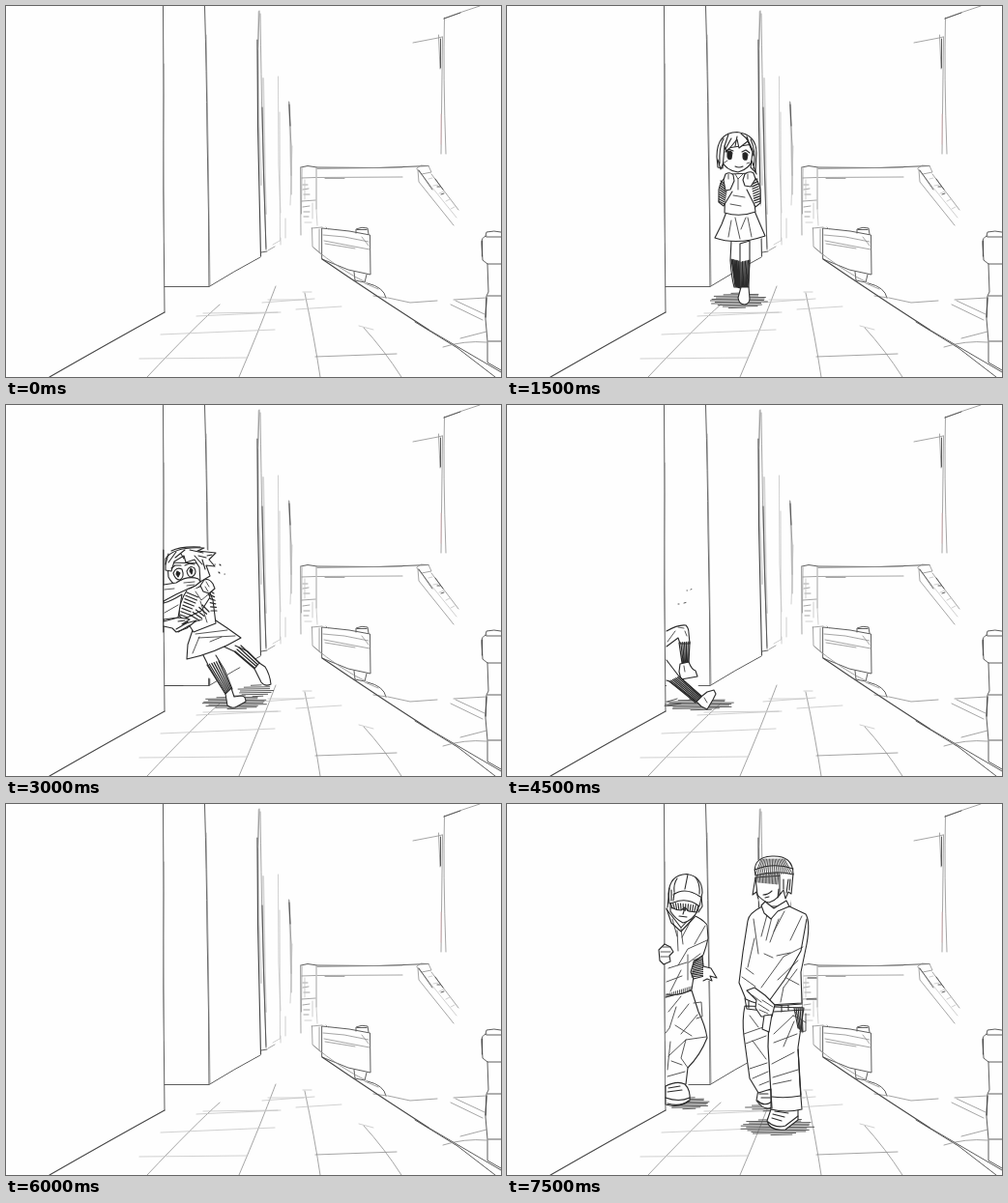
An HTML page for the animation above (8 s loop, 512 by 384 pixels).

```html
<!DOCTYPE html>
<html lang="en">
<head>
<meta charset="utf-8">
<title>Street sketch</title>
<style>
html, body { margin: 0; width: 100%; height: 100%; overflow: hidden; background: #fefefe; }
svg { display: block; width: 100vw; height: 100vh; }
path { fill: none; stroke: #555; stroke-width: .95; stroke-linecap: round; stroke-linejoin: round; }
.pale { stroke: #c4c4c4; stroke-width: .8; }
.mid { stroke: #8f8f8f; stroke-width: .8; }
.soft { stroke: #bbb; stroke-width: 2; stroke-opacity: .6; }
.bold { stroke: #484848; stroke-width: 1.15; }
.pose path { stroke: #2a2a2a; stroke-width: 1.1; }
.pose .body { fill: #fefefe; }
.pose .mask { fill: #fefefe; stroke: none; }
.pose .ink { fill: #222; }
.pose .fine { stroke: #444; stroke-width: .9; }
.pose .shade { stroke: #555; stroke-width: .95; }
.pose .dense { stroke-width: 1.2; }
.pose { opacity: 0; animation: 8s step-end infinite; }
.walk { animation-name: walk; }
.grab { animation-name: grab; }
.legs { animation-name: legs; }
.pair { animation-name: pair; }
@keyframes walk { 0%, 37.5%, 100% { opacity: 0 } 18.75% { opacity: 1 } }
@keyframes grab { 0%, 56.25%, 100% { opacity: 0 } 37.5% { opacity: 1 } }
@keyframes legs { 0%, 75%, 100% { opacity: 0 } 56.25% { opacity: 1 } }
@keyframes pair { 0% { opacity: 0 } 93.75%, 100% { opacity: 1 } }
</style>
</head>
<body>
<svg viewBox="0 0 512 384" preserveAspectRatio="none">
  <!-- buildings -->
  <path d="M162.5 0L163 92 162.8 190 164 317"/>
  <path class="mid" d="M163.2 60L162.6 135 163.6 245"/>
  <path class="bold" d="M164 317Q106 349 45 384"/>
  <path d="M164 290.5L210 290.5Q235 275 263 260"/>
  <path d="M205.5 0Q207.5 70 208 130L209.5 215 210 290"/>
  <path class="mid" d="M207 30L209 145 211 289"/>
  <path class="soft" d="M261.5 6L260.5 45 261.5 120 264 185M266 75L268 185 269 215M293 100L295 175"/>
  <path class="bold" d="M260 35L260.5 125 263.5 259"/>
  <path class="mid" d="M262 5L260.5 45M263 8Q264 75 265 125L269 250"/>
  <path d="M265 105L266.5 175 269 252M264 255L270 254"/>
  <path class="mid" d="M271 253L278 249M292.5 99L295 145 295 195"/>
  <path d="M293 102L294 124"/>
  <path class="pale" d="M281.5 73L282 165 284 214M283 110L283.5 243M296 145L294 206M284 240V247M289 220V240M276 247L283 243"/>
  <!-- footbridge -->
  <path d="M305 167L312 165.5 322 167 385 167.5 437 165.5"/>
  <path class="mid" d="M322 168.5L410 167M322 177.5L410 177M330 178.5H350"/>
  <path class="mid" d="M304.5 167L305 237M306 168L305.5 215M321 167V210M306 178L320 177.5M306 202L320 201M307 185H312M307 190L313 189M308 195H314M307 208L314 207M308 213H314M308 218H313"/>
  <path class="pale" d="M309 180V200M317 204V220M309 224H316M321 210L322 227"/>
  <path class="mid" d="M425 168L429 165 437 165.5 440 172 430 174ZM426 170L427 182 463 227M440 174L468 211"/>
  <path class="pale" d="M429 173L449 198 466 219M437 179L441 178M442 186L447 185M448 194L453 192M455 202L459 200M460 210L464 208"/>
  <path d="M427 170L441 190M444 179L452 190M446 187L449 187M450 195L453 194"/>
  <!-- lamp and far building -->
  <path class="mid" d="M421 38L447 33 451 32M447.5 30L449 65M451.5 32L450 153M453.5 12Q452 70 455 153M453 13L472 6 490 0"/>
  <path d="M453 13L470 7M449.5 34V64"/>
  <path d="M450 112V143" style="stroke:#e3b7ba;stroke-width:.8"/>
  <!-- guard rail -->
  <path d="M327 230L355 233 376.5 237 377 278 354 273 327 262ZM362 235L362 231Q368 228 374 230L375 236M363 231.5H373"/>
  <path class="mid" d="M316 230L327 229M316.5 230L317 249 327 258M324 231V255M328 237L350 239 375 244M329 243L376 252M330 246L361 251M331 229L333 231M368 239L375 248"/>
  <path d="M360 275L361 284 371 286 373 278M374 287Q391 291 393 302"/>
  <path class="mid" d="M318 250Q345 273 374 287M371 287L385 293M380 300L394 302"/>
  <path class="bold" d="M327 262L352 279 394 307 437 335"/>
  <path d="M437 335L512 379M423 327L467 354 506 384"/>
  <!-- near post -->
  <path d="M496 238L497 234Q505 232 512 234M497 239H512M497 238Q491 239 492 247L493 263 498 267H512M498 267L499 296 497 300 496 324 498 347V369L512 377M498 300H512M499 347H512"/>
  <path class="bold" d="M492.5 243V259M497 302L496 322"/>
  <path class="mid" d="M452 353Q474 346 497 348M463 304L497 302M395 302L418 307 446 305M465 305L495 319M460 309L493 325M470 344L497 337"/>
  <!-- paving -->
  <path class="mid" d="M221 309Q195 332 146 384M279 290Q262 335 241 384M309 297Q319 344 325 384M370 333Q391 356 409 384M320 363L404 360"/>
  <path class="pale" d="M197 321L284 317M204 318L281 317M160 340L278 335M138 365L250 364M265 307L319 303M271 304H308M300 314L347 311M307 296H316M365 331L380 335"/>

  <g class="pose walk">
    <path class="mask" d="M218 168L217 150 226 133 240 130 254 138 258 174 263 208 267 239 251 245 250 308 240 309 235 292 232 243 216 240 226 212 219 205Z"/>
    <path class="shade" data-shade="241 305 29 8 11"/>
    <path class="body" d="M232 243L231 263Q232 280 235 291L241 291 241 246 251 243 251 262 250 291 241 291"/>
    <path class="dense" data-hatch="232 262 240 264 236 290 241 292 7"/>
    <path class="dense" data-hatch="242 265 251 263 242 293 249 292 7"/>
    <path class="body" d="M242 291L239 302Q240 309 246 309 251 308 251 303L250 291Z"/>
    <path class="body" d="M227 213L222 226 215 240Q238 248 267 238L261 224 256 212Z"/>
    <path class="fine" d="M232 222L229 239M236 219L241 241M249 219L253 239M247 219L242 231"/>
    <path class="body" d="M231 174Q225 188 225 214 241 219 257 213L254 190 252 173Z"/>
    <path class="body" d="M228 176Q221 180 219 190L219 203 224 207 233 192M252 175Q260 178 262 190L262 204 257 208 248 190"/>
    <path class="dense" data-hatch="221 181 219 202 228 187 225 205 10"/>
    <path class="dense" data-hatch="253 182 256 204 259 179 262 202 10"/>
    <path class="body" d="M224 180L226 174Q231 171 234 175L235 181 231 190 226 191ZM244 180L246 174Q251 170 255 173L257 179 252 187 246 186Z"/>
    <path class="fine" d="M229 174V179M249 174V179M236 174L239 179 244 174M239 179V190M234 196L246 198M231 205L242 207"/>
    <path class="body" d="M222 148L222 160Q226 170 239 172 251 169 255 157L254 143Z"/>
    <path class="body" d="M218 167L217 156Q217 131 238 130.5 258 133 258 152L257 172 252 167 254 151 249 140 240 147 238 138 227 151 225 145 223 168Z"/>
    <path d="M224 137Q219 147 220 163M229 133L225 145M242 132Q253 140 255 155M252 138Q258 150 255 168M238 135L236 145M232 137L226 148M248 135L253 149M218 159L221 169 224 162M253 160L258 174"/>
    <path class="ink" d="M228 151Q231 149 233 152L232 158Q229 160 228 156ZM244 153Q247 150 249 154L248 159Q244 160 244 156Z"/>
    <path d="M226 151L229 148 234 150M243 151L247 149 251 152M236 166Q240 168 244 166"/>
    <path class="fine" d="M225 162L228 160M248 163L251 162"/>
  </g>

  <g class="pose grab">
    <path class="mask" d="M164 160L171 149 197 146 216 153 211 180 218 213 243 241 236 248 264 268 274 289 264 290 238 268 210 284 209 282 202 258 187 263 192 236 176 236 164 222Z"/>
    <path class="shade" data-shade="259 296 18 6 7"/>
    <path class="shade" data-shade="238 308 33 7 10"/>
    <path class="body" d="M203 257L209 269 227 299 234 294 226 274 217 259M223 249L236 255 257 273 262 267 250 255 237 249"/>
    <path class="dense" data-hatch="208 269 220 265 227 299 233 294 6"/>
    <path class="dense" data-hatch="237 255 243 249 257 272 262 267 4"/>
    <path class="body" d="M227 299L229 311Q234 315 239 312L248 307Q248 301 243 301L236 302 233 293ZM257 273L264 287Q268 292 274 289 273 279 268 271L262 267Z"/>
    <path class="body" d="M193 233L188 248 187 263Q216 257 243 241L229 231 217 223Z"/>
    <path class="fine" d="M196 237L229 233M199 241L237 239M211 245L223 240M200 240L193 257"/>
    <path class="body" d="M190 194L180 213 194 235 217 226 214 202 207 184Z"/>
    <path class="body" d="M187 192Q179 204 179 218L183 222 202 213 211 199 206 188"/>
    <path class="fine" d="M196 193L202 202 213 193M201 203L208 225M190 226L203 222"/>
    <path class="dense" data-hatch="187 194 180 217 199 199 188 220 8"/>
    <path class="dense" data-hatch="190 217 203 207 200 223 210 214 5"/>
    <path class="dense" data-hatch="210 192 212 213 215 195 218 213 6"/>
    <path class="body" d="M167 163L168 178Q174 190 190 190 204 185 207 164Z"/>
    <path class="body" d="M165 171L165 159Q174 146 205 148L198 151 217 153 210 160 216 167 207 166 211 177 201 183 200 168 195 160 186 163 184 156 174 162 171 172Z"/>
    <path d="M176 152L168 163M185 150L175 158M190 150L204 153M199 156L207 158M171 151Q180 146 201 147M203 160L206 170M195 156L203 165M181 154L184 159M208 156L213 155M168 154L165 165"/>
    <path class="body" d="M173 174Q176 167 182 170 185 178 180 181 175 181 173 174ZM187 172Q190 165 195 169 198 175 192 178 188 178 187 172Z"/>
    <path class="ink" d="M177 172L180 174 178 178 176 175ZM191 169L193 171 192 175 190 172Z"/>
    <path d="M171 169L175 166 181 166M185 166L190 164 195 165"/>
    <path class="body" d="M163 186L176 184Q188 176 199 180L201 183 196 187 189 190 176 196 163 203"/>
    <path class="body" d="M201 187L205 181Q210 179 214 185L216 190 210 195 204 193Z"/>
    <path class="fine" d="M184 184L195 183M187 187L195 186M164 191L174 190M207 183L210 188M206 188L209 193"/>
    <path class="body" d="M163 205Q171 203 182 196L178 220 163 222"/>
    <path class="body" d="M163 224L178 220Q188 221 190 222L182 227 197 223 187 231 176 235 172 231 163 229"/>
    <path d="M176 232L188 225M178 235L190 228M178 224L185 223"/>
    <path class="fine" d="M164 215L178 207M165 290.5H183"/>
    <path d="M216 165H216.3M221 165L222 166M220 173L221 174M226 175H226.3"/>
    <path d="M162.8 150V235M210 283V290"/>
  </g>

  <g class="pose legs">
    <path class="mask" d="M164.5 233L187 229 190 266 197 282 198 293 165 295Z"/>
    <path class="shade" data-shade="200 310 36 6 9"/>
    <path class="body" d="M165 234Q177 227 185 228 188 231 188 236L189 247 179 247 177 241 165 250"/>
    <path class="fine" d="M166 245L174 234M184 234L186 239M177 230L183 231"/>
    <path class="dense" data-hatch="178 246 189 245 181 267 188 267 7"/>
    <path class="body" d="M179 268L188 266Q191 274 195 275L197 281 180 284 178 276Z"/>
    <path class="body" d="M165 264L178 281 202 303 196 307 168 286 165 285"/>
    <path class="dense" data-hatch="168 286 178 281 195 308 202 302 7"/>
    <path class="body" d="M196 307L202 301 207 297 214 295 216 299 213 305 207 315 201 312Z"/>
    <path class="fine" d="M204 303L207 308M166 307L176 304M166 311L180 309M183 270L184 276"/>
    <path class="fine" d="M177 206H178M183 205L185 204.5M186 192H186.5M190 191L191 190.5"/>
  </g>

  <g class="pose pair">
    <path class="mask" d="M164 108L168 80 184 72 202 82 200 113 208 125 204 168 217 178 210 183 193 183 206 242 187 274 188 307 164 312Z"/>
    <path class="shade" data-shade="188 310 22 6 9"/>
    <path class="body" d="M164 200L191 193 198 215Q205 229 207 242 200 260 187 273L185 290 164 293"/>
    <path class="fine" d="M180 199L167 215M175 210L168 232 164 237M188 207L177 221M197 218L180 238M206 241L185 244 167 261M185 244L180 263 187 273M193 206L201 205 202 220 196 222M169 246L166 275M166 282L184 277M170 266L181 270M174 229L191 240"/>
    <path class="body" d="M164 292Q176 286 184 290 190 296 189 307 178 315 164 311Z"/>
    <path class="dense" d="M164 304Q178 309 189 304M166 310Q179 314 188 307"/>
    <path d="M167 294L179 292M166 298L181 296"/>
    <path class="body" d="M165 109L173 119 180 128 192 115Q201 118 207 125L208 139Q206 148 203 156L195 166 191 192Q179 199 165 197"/>
    <path class="fine" d="M171 119L176 137M176 131L177 152M180 129L182 145M191 119L181 138M205 126L194 145M207 141L187 150 177 167M187 156V182M180 172L169 194M200 155L188 164M167 170L186 164M165 184L181 178"/>
    <path d="M165 108L170 123 180 132 194 117"/>
    <path class="fine" data-hatch="165 197 190 189 165 200 190 193 14"/>
    <path class="body" d="M193 164L202 157 204 178 193 181 190 174Z"/>
    <path data-hatch="202 158 204 177 193 162 191 179 11"/>
    <path class="body" d="M203 168L211 170 217 180 210 178 212 183 207 181 203 183"/>
    <path class="body" d="M169 100L169 111Q174 119 182 123 192 121 198 109V98Z"/>
    <path data-hatch="169 102 198 105 171 108 196 112 12"/>
    <path d="M170 107Q175 110 180 110L184 107 188 111 196 112"/>
    <path class="body" d="M168 103L167 93Q168 73 186 72.5 202 75 202 92L199 106Q187 96 172 102Z"/>
    <path d="M172 94Q184 85 200 96M172 100L173 92M187 73L184 88M176 77Q172 83 173 91M201 96L202 106 198 112M168 87L166 107M170 89V100M178 116L186 117M184 108L182 114M195 76Q200 82 199 93"/>
    <path class="body" d="M163 145L169 148 172 153 168 157 169 163 162 166 158 162 157 151Z"/>
    <path class="fine" d="M159 153L169 153M159 158L168 158M161 148L169 148"/>

    <path class="mask" d="M255 77L257 59 274 53 296 65 293 107 309 114 308 148 305 207 305 316 301 327 286 338 269 330 272 315 258 310 251 283 244 238 246 199 239 184 249 119 262 106Z"/>
    <path class="shade" data-shade="273 314 24 4 5"/>
    <path class="shade" data-shade="281 334 37 9 12"/>
    <path class="body" d="M260 295L258 307Q266 318 274 314V296Z"/>
    <path d="M259 307Q266 314 274 308M261 300H270M263 304H272"/>
    <path class="body" d="M273 316L269 328Q272 339 288 337L301 327V316Z"/>
    <path d="M270 329Q278 336 288 333L301 323M275 321L287 324M274 325L284 328M277 318L291 320"/>
    <path class="body" d="M246 209Q243 223 245 240L251 284 260 299 273 295 273 316Q289 320 305 316L303 291 301 252 307 211Z"/>
    <path class="fine" d="M276 238L296 219M276 247L300 238M297 225L286 251M274 269L297 257M275 283L301 275M275 290L294 286M245 238L265 231M247 248L268 240M254 245L268 264M251 274L269 268M254 284L270 277M251 219L260 231M261 291L271 287"/>
    <path class="dense" d="M271 220L270 251 274 315M301 254L304 301"/>
    <path d="M274 303Q288 305 304 302"/>
    <path class="body" d="M264 106Q250 113 249 121L244 153 240 185 247 202Q259 208 271 208L305 206 304 174 310 145Q314 122 309 114L292 106Z"/>
    <path class="fine" d="M255 119L260 155M256 139L249 169M275 113L268 141M270 111L263 137M281 119L272 143M287 111L276 132M305 116L293 141M306 148L286 158 263 190M301 162L280 182M300 171L286 190M293 154L279 157M289 180L302 187M243 179L257 189M247 170L255 176M286 190L283 205M266 155L275 159"/>
    <path d="M310 119L304 152 287 182 271 204M246 201L248 212 264 214M276 209L305 207M276 215L307 213M250 204V211M284 209V215M291 208V214"/>
    <path class="body" d="M248 193L256 190 267 198 277 208 274 220 263 220 257 211 258 203Z"/>
    <path class="fine" d="M254 198L263 205M260 207L271 214M264 203L275 210M261 213L270 217"/>
    <path class="body" d="M266 219L264 233 271 236 274 218Z"/>
    <path data-hatch="297 211 305 210 301 232 306 236 5"/>
    <path class="fine" d="M297 214L305 224 303 236 309 235 309 217M296 219L309 226"/>
    <path class="body" d="M263 105L267 101 276 108 289 100 292 106 280 111 273 119 266 113Z"/>
    <path class="body" d="M257 76L259 94Q265 101 271 102 282 99 287 84L286 74Z"/>
    <path class="fine" data-hatch="258 72 281 71 259 81 280 83 16"/>
    <path class="body" d="M282 73V94L286 89 288 98 291 91 294 93 296 72"/>
    <path d="M257 76L254 94 258 91 260 98M286 78V88M291 78L289 92M265 94Q270 94 274 90M267 97L271 96M293 78L292 89M281 88L280 97"/>
    <path class="body" d="M257 74Q253 55 274 54 296 53 296 73 278 68 257 74Z"/>
    <path class="fine" data-hatch="263 57 287 57 257 73 295 72 18"/>
    <path d="M256 68Q276 60 296 67"/>
    <path class="pale" d="M311 180H320M310 202H320"/>
  </g>
</svg>
<script>
const mix = (a, b, t) => a + (b - a) * t;
const point = (x, y) => `${x.toFixed(1)} ${y.toFixed(1)}`;
const numbers = text => text.split(' ').map(Number);

// Strokes joining evenly spaced points on two edges.
for (const path of document.querySelectorAll('[data-hatch]')) {
  const [ax, ay, bx, by, cx, cy, dx, dy, count] = numbers(path.dataset.hatch);
  let d = '';
  for (let i = 0; i < count; i++) {
    const t = i / (count - 1);
    d += `M${point(mix(ax, bx, t), mix(ay, by, t))}L${point(mix(cx, dx, t), mix(cy, dy, t))}`;
  }
  path.setAttribute('d', d);
}

// Ground shadow: uneven, nearly level strokes within an ellipse.
for (const path of document.querySelectorAll('[data-shade]')) {
  const [cx, cy, rx, ry, count] = numbers(path.dataset.shade);
  let d = '';
  for (let i = 0; i < count; i++) {
    const v = mix(-.95, .95, i / (count - 1));
    const half = rx * Math.sqrt(1 - v * v);
    const shift = Math.sin(i * 2.4) * rx * .1;
    d += `M${point(cx - half + shift, cy + v * ry)}L${point(cx + half * .9 + shift, cy + v * ry - .5)}`;
  }
  path.setAttribute('d', d);
}
</script>
</body>
</html>
```
